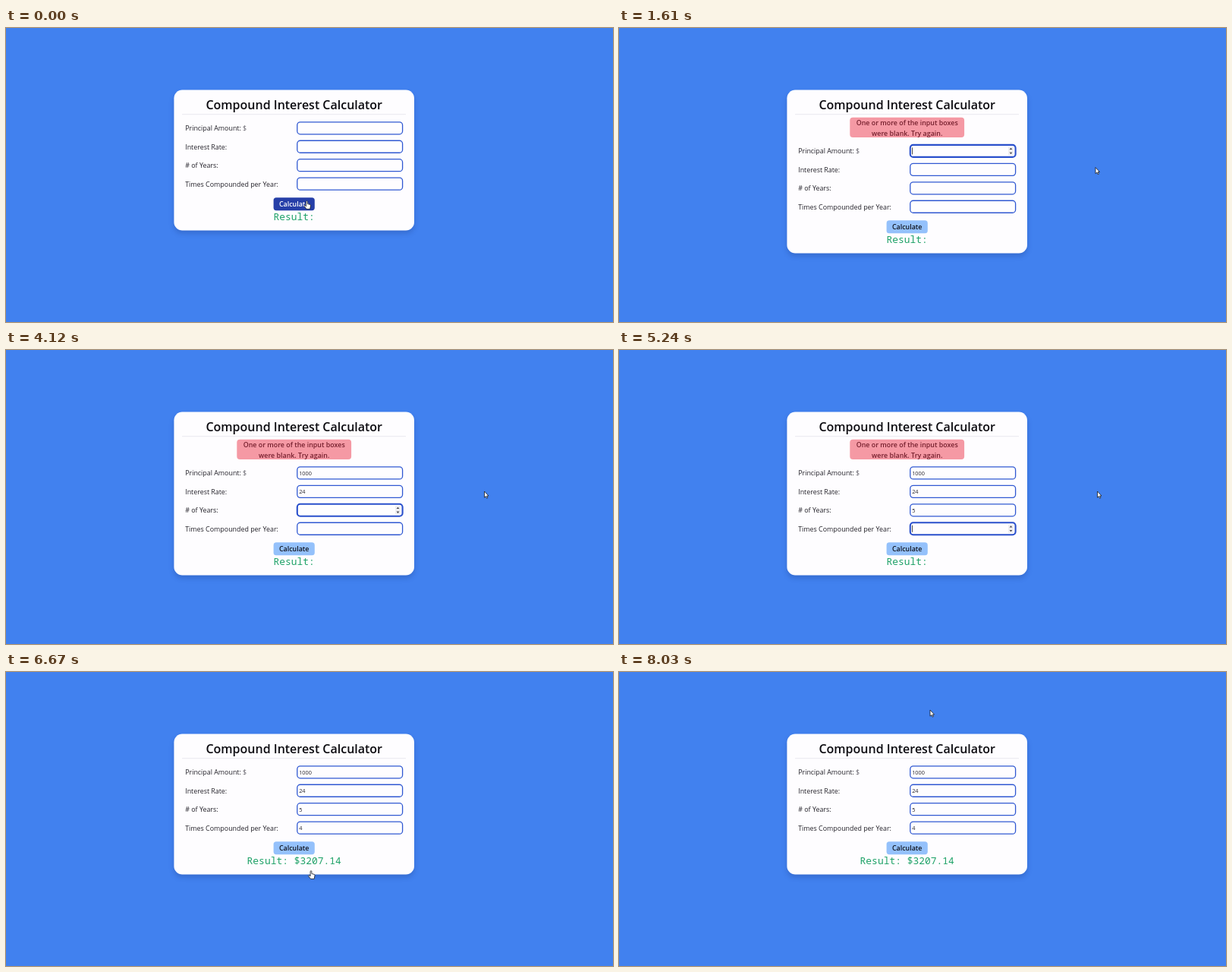
These frames come from a looping animation (800x387 px, 8090 ms). An HTML page:

```html
<!DOCTYPE html>
<html lang="en">
<head>
<meta charset="utf-8">
<title>Compound Interest Calculator</title>
<style>
  html, body { margin: 0; width: 100%; height: 100%; overflow: hidden; background: #4181ef; }
  svg { display: block; width: 800px; height: 387px; }
  text { font: 8.9px "Open Sans", "Noto Sans", sans-serif; fill: #24222a; }
  .mid { text-anchor: middle; }
  .title { font-size: 16px; font-weight: 600; fill: #0c0b10; }
  .card { fill: #fefdff; filter: drop-shadow(0 4px 3px rgba(10, 30, 90, .2)); }
  .error rect { fill: #f599a4; }
  .error text { font-weight: 600; fill: #76202e; }
  .field { fill: #fefdff; stroke: #3159d2; stroke-width: 1.3; }
  .focus .field { stroke: #2a50cc; stroke-width: 2.1; }
  .value { font-size: 7.3px; }
  .spin { visibility: hidden; }
  .focus .spin { visibility: visible; }
  .caret { stroke: #111; stroke-width: .8; visibility: hidden; }
  .button rect { fill: #94c1fb; }
  .button text { font-weight: 600; fill: #10131c; }
  .hover rect { fill: #263fa8; }
  .hover text { fill: #fff; }
  .result { font: 12.95px "Noto Sans Mono", "DejaVu Sans Mono", monospace; fill: #1fa268; }
  .pointer path { fill: #fff; stroke: #16181f; stroke-width: .8; stroke-linejoin: round; }
  .pointer .beam { fill: none; }
</style>
</head>
<body>
<svg viewBox="0 0 800 387">
  <rect width="800" height="387" fill="#4181ef"/>
  <rect class="card" id="card" x="221.4" y="81.6" width="316.6" rx="11"/>
  <text class="title mid" x="379.7" y="107">Compound Interest Calculator</text>
  <path d="M232 113.7H527" stroke="#e9e7ef" stroke-width=".9"/>
  <g class="error" id="error">
    <rect x="304.3" y="117.8" width="150.8" height="26.3" rx="4"/>
    <text class="mid" x="379.7" y="128.3">One or more of the input boxes</text>
    <text class="mid" x="379.7" y="141.6">were blank. Try again.</text>
  </g>
  <g id="form">
    <g id="rows"></g>
    <g class="button" id="button">
      <rect x="352.6" y="223.2" width="54.2" height="17" rx="3.6"/>
      <text class="mid" x="379.7" y="235.3">Calculate</text>
    </g>
    <text class="result mid" id="result" x="379.7" y="253.2"></text>
  </g>
  <g class="pointer" id="pointer">
    <path id="arrow" d="M0 0V8.2L1.9 6.5L3.1 9.2L4.4 8.6L3.2 6H5.5Z"/>
    <path id="hand" d="M-.9 .8Q0-.6 .9 .8V4L4.3 4.9Q5.2 5.2 5 6.3L4.2 10.8H-.5L-3.3 7.2Q-3.5 5.7-2.2 6.1L-.9 7.2Z"/>
    <path id="beam" class="beam" d="M-1.5-4.5H1.5M0-4.5V4.5M-1.5 4.5H1.5"/>
  </g>
</svg>
<script>
  const LOOP = 8090, SHIFT = 30.1, BLINK = 530;
  const ERROR_ON = 330, SUBMIT = 6655;
  const $ = id => document.getElementById(id);

  // Each field: focus time, blur time, typed text and the time of each key.
  const fields = [
    { label: 'Principal Amount:', from: 1100, to: 2550, text: '1000', keys: [1880, 2020, 2130, 2240] },
    { label: 'Interest Rate:', from: 2550, to: 3550, text: '24', keys: [3020, 3170] },
    { label: '# of Years:', from: 3550, to: 5150, text: '5', keys: [4600] },
    { label: 'Times Compounded per Year:', from: 5150, to: SUBMIT, text: '4', keys: [5500] }
  ];

  // Pointer stops: time, x, y
  const stops = [
    [0, 396.5, 227.5], [480, 396.5, 228], [980, 462, 163], [1130, 462, 163],
    [1500, 628, 183.5], [1680, 628, 183.5], [1900, 630.5, 186],
    [5850, 630.5, 186], [6240, 407.5, 260], [6300, 407.5, 260], [6420, 402, 261.5],
    [6800, 402, 261.5], [7350, 618, 238], [7570, 618, 238], [8010, 410, 50], [LOOP, 410, 50]
  ];

  $('rows').innerHTML = fields.map((f, i) => {
    const y = 131.8 + i * 24.45;
    return `<g id="row${i}">
      <text x="236.2" y="${y + 3.6}">${f.label}</text>
      ${i ? '' : `<text x="312" y="${y + 3.6}" style="fill:#68666f">$</text>`}
      <rect class="field" x="383.8" y="${y - 8}" width="138.8" height="16" rx="4"/>
      <text class="value" x="386.2" y="${y + 2.8}"></text>
      <path class="caret" d="M0 ${y - 4.5}V${y + 4.5}"/>
      <g class="spin">
        <rect x="513" y="${y - 5.5}" width="7" height="11" fill="#efeef1"/>
        <path d="M514.6 ${y - 1.8}l1.9-2.3 1.9 2.3zM514.6 ${y + 1.8}l1.9 2.3 1.9-2.3z" fill="#44434a"/>
      </g>
    </g>`;
  }).join('');

  fields.forEach((f, i) => {
    f.row = $('row' + i);
    f.value = f.row.querySelector('.value');
    f.caret = f.row.querySelector('.caret');
  });

  const show = (el, on) => { el.style.visibility = on ? 'visible' : 'hidden'; };

  function pointerAt(t) {
    const n = stops.findIndex(s => s[0] > t);
    const [t0, x0, y0] = stops[n - 1], [t1, x1, y1] = stops[n];
    const p = (t - t0) / (t1 - t0), k = p * p * (3 - 2 * p);
    return [x0 + (x1 - x0) * k, y0 + (y1 - y0) * k];
  }

  function drawField(f, t) {
    const focused = t >= f.from && t < f.to;
    const typed = f.keys.filter(k => k <= t);
    const since = t - (typed.length ? typed[typed.length - 1] : f.from);
    f.row.setAttribute('class', focused ? 'focus' : '');
    f.value.textContent = f.text.slice(0, typed.length);
    f.caret.setAttribute('transform', `translate(${386.6 + typed.length * 4.17})`);
    show(f.caret, focused && Math.floor(since / BLINK) % 2 === 0);
  }

  function draw(t) {
    const failed = t >= ERROR_ON && t < SUBMIT;
    const dy = failed ? SHIFT : 0;
    const [x, y] = pointerAt(t);
    const fy = y - dy;

    show($('error'), failed);
    $('card').setAttribute('height', 184.8 + dy);
    $('form').setAttribute('transform', `translate(0 ${dy})`);
    $('result').textContent = t >= SUBMIT ? 'Result: $3207.14' : 'Result:';
    fields.forEach(f => drawField(f, t));

    const hover = x > 352 && x < 406.8 && fy > 223 && fy < 240.5;
    const hand = hover || (t >= SUBMIT && t < 6800);
    const beam = !hand && x > 383 && x < 523 &&
      fields.some((f, i) => Math.abs(fy - 131.8 - i * 24.45) < 8.5);
    $('button').setAttribute('class', hover ? 'button hover' : 'button');
    show($('hand'), hand);
    show($('beam'), beam);
    show($('arrow'), !hand && !beam);
    $('pointer').setAttribute('transform', `translate(${x} ${y})`);
  }

  const start = performance.now();
  function tick() {
    draw((performance.now() - start) % LOOP);
    requestAnimationFrame(tick);
  }
  tick();
</script>
</body>
</html>
```
